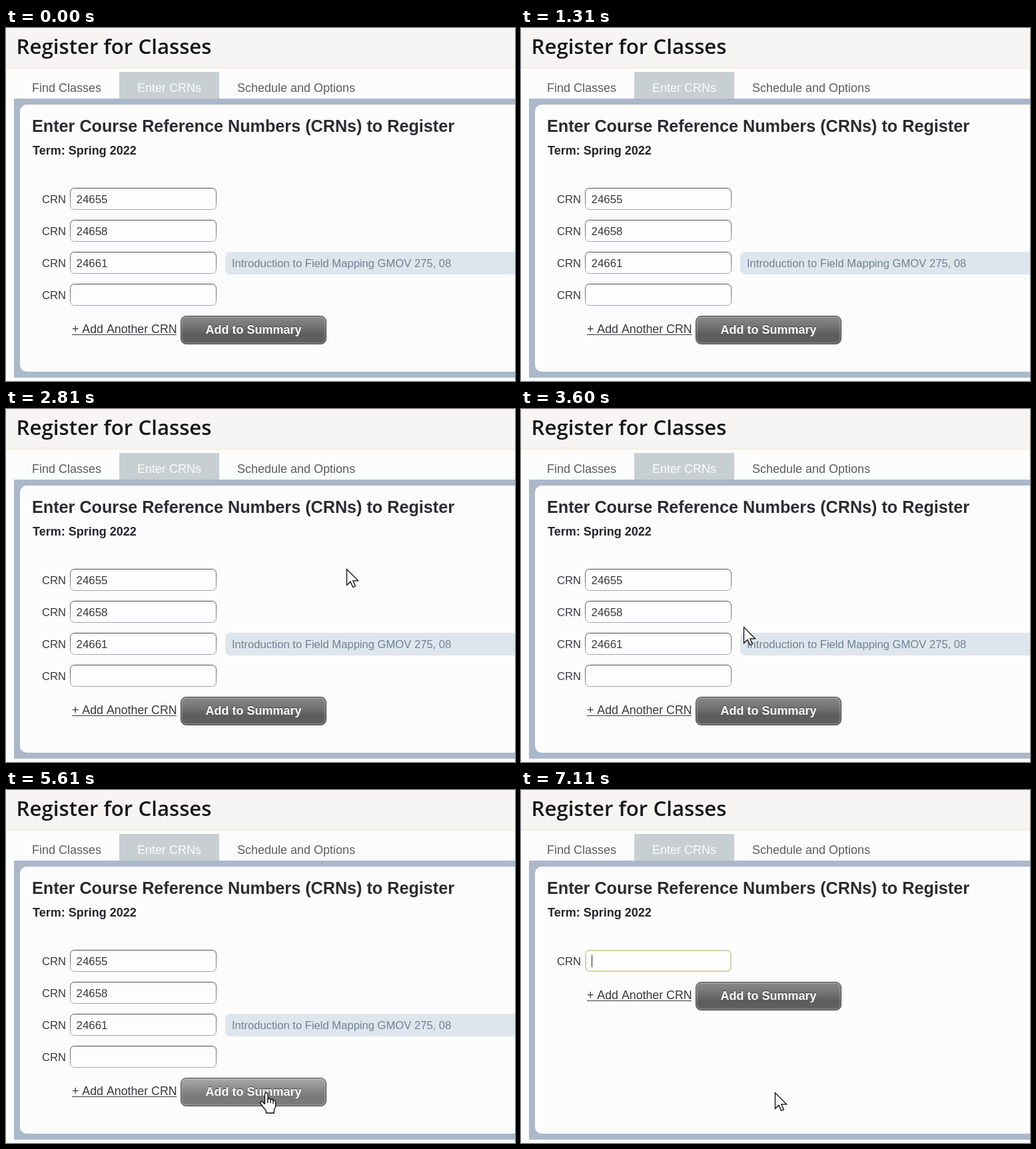
Recreate the animation shown at these times as an HTML page with a canvas. Size 764x530 px, loop 7150 ms.

```html
<!DOCTYPE html>
<html lang="en">
<head>
<meta charset="utf-8">
<title>Register for Classes</title>
<style>
html, body { margin: 0; width: 100%; height: 100%; overflow: hidden; background: #fcfcfc; }
canvas { display: block; }
</style>
</head>
<body>
<canvas id="stage" width="764" height="530"></canvas>
<script>
const ctx = document.getElementById('stage').getContext('2d');
const LOOP = 7150;
const CLICK = 6250;
const SANS = '"Liberation Sans", Arial, sans-serif';
const INK = '#38393b';
const CRNS = ['24655', '24658', '24661', ''];

// Pointer hotspot: time, x, y
const PATH = [
  [1760, 790, 440], [2060, 720, 404], [2500, 600, 278], [3000, 461, 238],
  [3600, 334, 327], [4050, 362, 400], [4450, 391, 454], [6450, 391, 454],
  [6850, 381, 454], [7150, 381, 454]
];

const ARROW = new Path2D('M.5 .5V24.5L6 19.4L9.7 27.5L13.4 26L9.8 17.9H17.6Z');
const HAND = new Path2D('M7.5 17V3Q7.5 .7 9.7 .7Q12 .7 12 3V10Q13 8.6 14.8 9.2Q16 9.6 16 11' +
  'Q17.5 9.8 19 10.6Q20 11.2 20 12.6Q21.5 11.6 22.8 12.6Q23.6 13.4 23.6 15V20' +
  'Q23.6 23 21.3 26.5V31H9.5V27.5Q6 24 3.5 19.8L.8 16.2Q.4 13.6 3 13.7Q4.4 14 7.5 18');
const KNUCKLES = new Path2D('M12 10V16M16 11V16M20 12.6V17');

function text(str, x, y, font, color) {
  ctx.font = font + ' ' + SANS;
  ctx.fillStyle = color;
  ctx.fillText(str, x, y);
}

function rect(x, y, w, h, color) {
  ctx.fillStyle = color;
  ctx.fillRect(x, y, w, h);
}

function round(x, y, w, h, r, fill, stroke, line = 1) {
  ctx.beginPath();
  ctx.roundRect(x, y, w, h, r);
  if (fill) {
    ctx.fillStyle = fill;
    ctx.fill();
  }
  if (stroke) {
    ctx.strokeStyle = stroke;
    ctx.lineWidth = line;
    ctx.stroke();
  }
}

function shade(y0, y1, ...colors) {
  const g = ctx.createLinearGradient(0, y0, 0, y1);
  colors.forEach((c, i) => g.addColorStop(i / (colors.length - 1), c));
  return g;
}

function drawFrame() {
  rect(0, 0, 764, 530, '#fcfcfc');
  rect(0, 0, 764, 61, '#f6f5f3');
  rect(0, 58, 764, 3, '#f3f0e6');
  ctx.font = '600 31.2px "Open Sans", "Noto Sans", sans-serif';
  ctx.fillStyle = '#16171a';
  ctx.fillText('Register for Classes', 15.6, 39);

  rect(170, 66, 150, 40, '#c8cfd2');
  text('Find Classes', 39, 96, '18px', '#5b5c5e');
  text('Enter CRNs', 197, 96, '18px', '#fcfcfc');
  text('Schedule and Options', 347, 96, '18px', '#5b5c5e');

  rect(12, 106, 752, 419, '#abb8ca');
  round(21, 115, 770, 401, 10, '#fcfcfc');
  text('Enter Course Reference Numbers (CRNs) to Register', 39, 156, 'bold 25.2px', '#2b2c2f');
  text('Term: Spring 2022', 40, 190, 'bold 18px', '#242528');
}

function drawField(y, value, focused) {
  text('CRN', 54, y + 23, '16.6px', INK);
  if (focused) {
    round(97, y + 1, 218, 31, 6, '#fdfdfd', '#d8d2ae', 2);
    rect(106, y + 8, 1, 18, '#222326');
  } else {
    round(96.5, y + 0.5, 219, 32, 6, '#fdfdfd', shade(y, y + 33, '#4c4d50', '#777b83', '#a0a6b0'));
    text(value, 105.5, y + 23, '16.9px', INK);
  }
}

function drawActions(y, hover) {
  text('+ Add Another CRN', 99, y + 26, '17.8px', INK);
  rect(99, y + 28, 157, 1, INK);
  const fill = hover
    ? shade(y, y + 43, '#acacac', '#909090', '#787878', '#7c7c7c')
    : shade(y, y + 43, '#8a8a8b', '#777778', '#5c5c5d', '#616162');
  round(262.5, y + 0.5, 218, 42, 8, fill, '#434447');
  round(264, y + 2, 215, 39, 7, null, 'rgba(205,207,212,.5)');
  text('Add to Summary', 299.5, y + 26, 'bold 18px', '#333437');
  text('Add to Summary', 299.5, y + 27, 'bold 18px', '#fdfdfd');
}

function drawForm(done, hover) {
  if (done) {
    drawField(240, '', true);
    drawActions(288, false);
    return;
  }
  CRNS.forEach((crn, i) => drawField(240 + 48 * i, crn, false));
  round(329, 336, 460, 34, 7, '#dee6ed');
  text('Introduction to Field Mapping GMOV 275, 08', 339, 359, '16.6px', '#6f8093');
  drawActions(432, hover);
}

function pointerAt(t) {
  if (t < PATH[0][0]) return null;
  let i = 0;
  while (i < PATH.length - 2 && t >= PATH[i + 1][0]) i++;
  const a = PATH[i], b = PATH[i + 1];
  const before = PATH[Math.max(0, i - 1)];
  const after = PATH[Math.min(PATH.length - 1, i + 2)];
  const span = b[0] - a[0];
  const u = (t - a[0]) / span;
  // Hermite curve that comes to rest on repeated points
  const slope = (p, q, n, k) =>
    (q[k] === p[k] || n[k] === q[k]) ? 0 : (n[k] - p[k]) / (n[0] - p[0]) * span;
  const axis = k => {
    const m0 = slope(before, a, b, k), m1 = slope(a, b, after, k);
    const u2 = u * u, u3 = u2 * u;
    return (2 * u3 - 3 * u2 + 1) * a[k] + (u3 - 2 * u2 + u) * m0 +
      (3 * u2 - 2 * u3) * b[k] + (u3 - u2) * m1;
  };
  return { x: Math.round(axis(1)), y: Math.round(axis(2)) };
}

function drawPointer(p, hand) {
  const shape = hand ? HAND : ARROW;
  ctx.save();
  ctx.translate(p.x - (hand ? 10 : 0), p.y);
  ctx.fillStyle = '#fefefe';
  ctx.strokeStyle = '#0a0a0c';
  ctx.lineWidth = 1.3;
  ctx.fill(shape);
  ctx.stroke(shape);
  if (hand) ctx.stroke(KNUCKLES);
  ctx.restore();
}

function draw(t) {
  const done = t >= CLICK;
  const p = pointerAt(t);
  const hover = !done && p !== null &&
    p.x >= 262 && p.x <= 481 && p.y >= 432 && p.y <= 475;
  drawFrame();
  drawForm(done, hover);
  if (p) drawPointer(p, hover);
}

const start = performance.now();
function tick(now) {
  draw(Math.max(0, now - start) % LOOP);
  requestAnimationFrame(tick);
}
draw(0);
requestAnimationFrame(tick);
</script>
</body>
</html>
```
